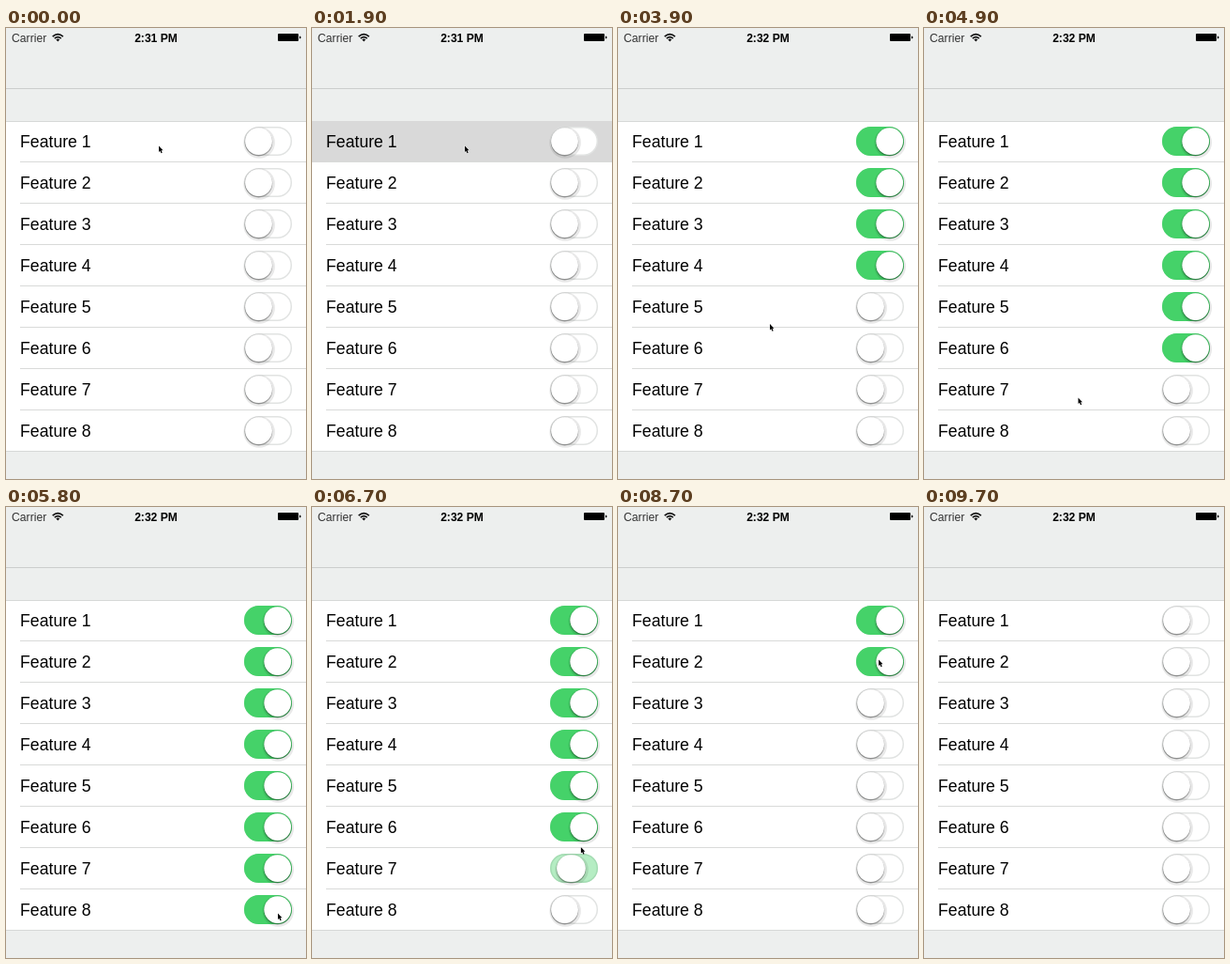
Animation of 320 by 480 pixels, one loop 9.8 s. Source, as an HTML page:

```html
<!DOCTYPE html>
<html lang="en">
<head>
<meta charset="utf-8">
<title>Feature switches</title>
<style>
html, body { margin: 0; width: 100%; height: 100%; overflow: hidden; background: #edefee; }
svg { display: block; width: 320px; height: 480px; }
text { font-family: "Liberation Sans", Arial, sans-serif; fill: #000; }
</style>
</head>
<body>
<svg viewBox="0 0 320 480" xmlns="http://www.w3.org/2000/svg">
  <defs>
    <filter id="soft" x="-30%" y="-30%" width="160%" height="160%"><feGaussianBlur stdDeviation="0.7"/></filter>
  </defs>
  <rect width="320" height="480" fill="#edefee"/>
  <rect y="64" width="320" height="1" fill="#cccecd"/>
  <text x="6" y="15" font-size="12.2" style="fill:#333">Carrier</text>
  <g fill="none" stroke="#111" stroke-width="1.7">
    <path d="M49.7 9.1Q55.3 4.1 60.9 9.1"/>
    <path d="M51.8 11.2Q55.3 8.2 58.8 11.2"/>
    <path d="M53.3 12.3Q55.3 10.8 57.3 12.3L55.3 14.4Z" fill="#111" stroke="none"/>
  </g>
  <text id="clock" x="160" y="15" font-size="12.1" font-weight="700" text-anchor="middle"></text>
  <rect x="290" y="6" width="22" height="8" rx="1" fill="#000"/>
  <path d="M313 8.4Q314.6 8.6 314.6 10T313 11.6Z" fill="#000"/>
  <rect y="99" width="320" height="352" fill="#d6d8d7"/>
  <rect y="100" width="320" height="350" fill="#fff"/>
  <g id="rows"></g>
  <path id="cursor" d="M0 0V6.6L1.4 5.2L2.5 7.8L3.7 7.2L2.6 4.8H4.5Z" fill="#000" stroke="#fff" stroke-width="0.6" paint-order="stroke"/>
</svg>
<script>
const LOOP = 9800, STEP = 100, ROWS = 8, PITCH = 44;
const LAST = ROWS - 1, OFF_START = 6000, OFF_GAP = 457;

// Rows are tapped on from top to bottom, then switched off from bottom to top.
const onTime = i => 1900 + 3600 * (i / LAST) ** 0.9;
const offTime = i => OFF_START + OFF_GAP * (LAST - i);

// Pointer path while tapping rows: time, x, y
const path = [
  [1900, 163, 125.5], [3000, 161.5, 208.5], [3900, 162, 315],
  [4900, 164.5, 393.5], [5500, 168, 428], [5800, 290, 432.5]
];

const $ = id => document.getElementById(id);
const clamp = v => Math.max(0, Math.min(1, v));
const ease = v => { v = clamp(v); return v * v * (3 - 2 * v); };
const mix = (a, b, k) => a + (b - a) * k;

function add(parent, tag, attrs) {
  const el = document.createElementNS("http://www.w3.org/2000/svg", tag);
  for (const name in attrs) el.setAttribute(name, attrs[name]);
  return parent.appendChild(el);
}

function makeRow(_, i) {
  const g = add($("rows"), "g", { transform: `translate(0 ${i * PITCH})` });
  const glow = add(g, "rect", { y: 99, width: 320, height: 44, fill: "#d9d9d9" });
  if (i < LAST) add(g, "rect", { x: 15, y: 142, width: 305, height: 1, fill: "#d9dad9" });
  add(g, "text", { x: 15, y: 127, "font-size": 17.7 }).textContent = `Feature ${i + 1}`;

  const track = { x: 254.7, y: 105.7, width: 49.6, height: 29.6, rx: 14.8, "stroke-width": 1.5 };
  add(g, "rect", { ...track, fill: "#fff", stroke: "#e1e3e2" });
  const green = add(g, "rect", { ...track, fill: "#45d269", stroke: "#45d269" });
  const disc = (dx, dy, r, style) => {
    const el = add(g, "rect", { y: 120.6 + dy - r, height: 2 * r, rx: r, ...style });
    return (x, stretch) => {
      el.setAttribute("x", x + dx - r - stretch);
      el.setAttribute("width", 2 * r + stretch);
    };
  };
  const discs = [
    disc(0.6, 1.4, 16.8, { opacity: 0.09 }),
    disc(0, 1, 14.8, { opacity: 0.3, filter: "url(#soft)" }),
    disc(0, 0, 14.4, { fill: "#fff" })
  ];

  return t => {
    const on = onTime(i), off = offTime(i);
    const level = ease((t - on) / 300) * (1 - ease((t - off - 100) / 250));
    const stretch = t >= off ? 5 * level : 0;
    glow.setAttribute("opacity", t < on ? 0 : 1 - clamp((t - on - 100) / 200));
    green.setAttribute("opacity", level);
    discs.forEach(place => place(mix(269.5, 289.7, level), stretch));
  };
}

const rows = Array.from({ length: ROWS }, makeRow);

function pointerAt(t) {
  const next = path.findIndex(p => p[0] > t);
  if (next === 0) return path[0].slice(1);
  if (next > 0) {
    const [t0, x0, y0] = path[next - 1], [t1, x1, y1] = path[next];
    const k = ease((t - t0) / (t1 - t0));
    return [mix(x0, x1, k), mix(y0, y1, k)];
  }
  // Rest on each switch, then glide up to the one above.
  const p = Math.max(0, (t - OFF_START) / OFF_GAP), n = Math.floor(p);
  const row = Math.max(0, LAST - n - ease((p - n - 0.35) * 3));
  return [276 + 2 * row, 117.5 + 45 * row];
}

function draw(time) {
  const t = Math.floor((time % LOOP) / STEP) * STEP;
  rows.forEach(update => update(t));
  $("clock").textContent = t < 2900 ? "2:31 PM" : "2:32 PM";
  $("cursor").setAttribute("transform", `translate(${pointerAt(t)})`);
  $("cursor").setAttribute("visibility", t < LOOP - STEP ? "visible" : "hidden");
}

const start = performance.now();
function frame() {
  draw(performance.now() - start);
  requestAnimationFrame(frame);
}
frame();
</script>
</body>
</html>
```
